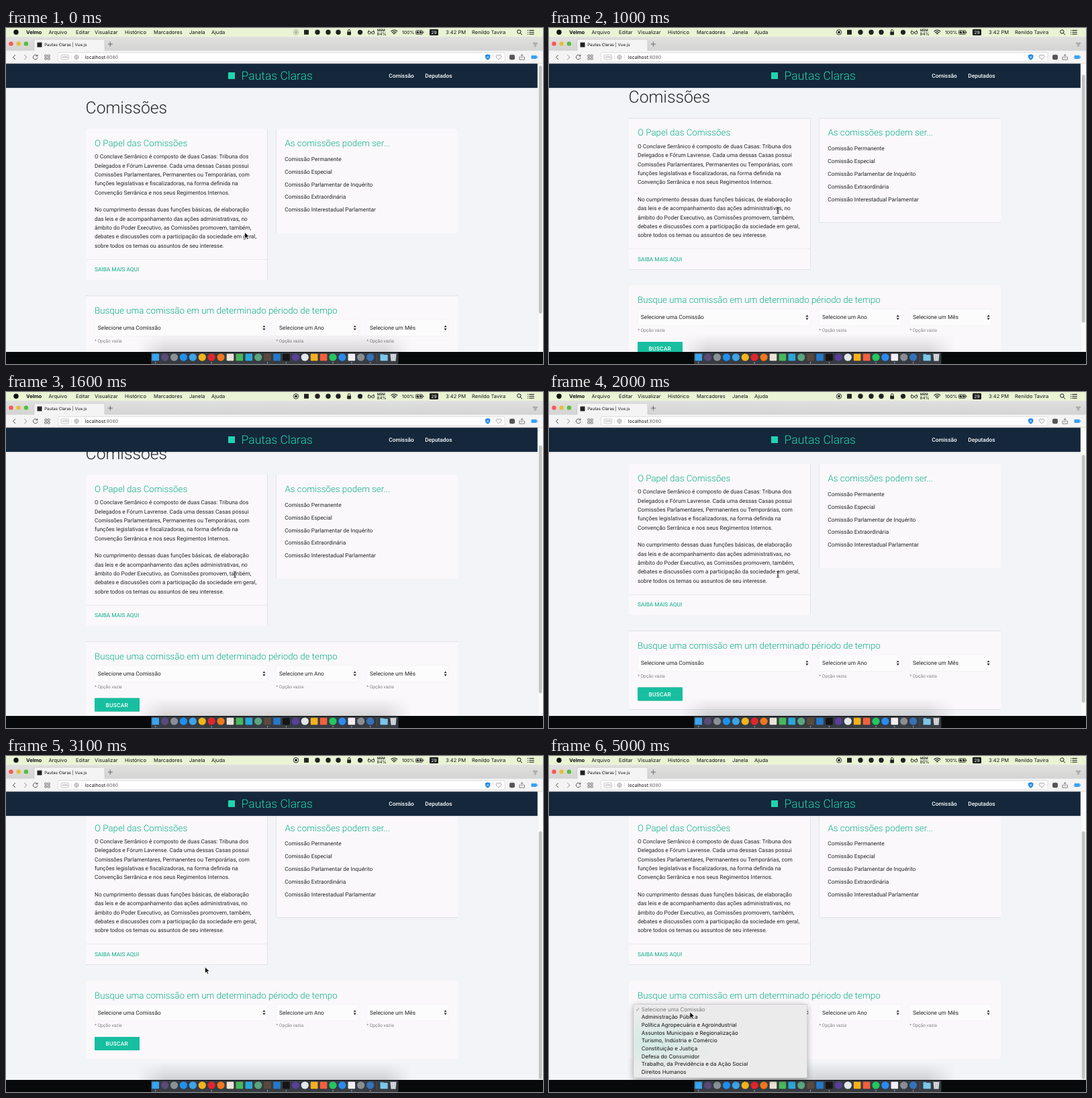
An HTML page that plays this animation: 800x500 px, repeating every 5100 ms.

```html
<!DOCTYPE html>
<html lang="pt-BR">
<head>
<meta charset="utf-8">
<title>Pautas Claras</title>
<style>
  html, body { margin: 0; width: 100%; height: 100%; overflow: hidden; background: #f3f4f7; }
  svg { display: block; width: 800px; height: 500px; }
  text { font-family: Roboto, sans-serif; font-size: 8.33px; fill: #232528; text-rendering: geometricPrecision; white-space: pre; }
  .ui { font-family: Inter, sans-serif; font-size: 7.55px; fill: #111; }
  .title { font-size: 13.33px; font-weight: 300; fill: #0cae8a; }
  .hint { font-size: 6.67px; fill: #808085; }
  .card { fill: #faf8fa; filter: drop-shadow(0 .9px .7px rgba(0, 0, 0, .32)); }
  .line { fill: none; stroke: #555; stroke-width: 1; }
</style>
</head>
<body>
<svg id="stage" viewBox="0 0 800 500" xmlns="http://www.w3.org/2000/svg">
  <defs>
    <clipPath id="view"><rect y="53" width="792" height="429"/></clipPath>
    <linearGradient id="tabs" x2="0" y2="1"><stop stop-color="#e0e1df"/><stop offset="1" stop-color="#d2d3d2"/></linearGradient>
    <linearGradient id="shade" x2="0" y2="1"><stop stop-opacity="0"/><stop offset="1" stop-opacity=".14"/></linearGradient>
    <linearGradient id="fade"><stop stop-color="#000"/><stop offset=".1" stop-color="#fff"/><stop offset=".9" stop-color="#fff"/><stop offset="1" stop-color="#000"/></linearGradient>
    <mask id="soft"><rect x="195" y="455" width="410" height="27" fill="url(#fade)"/></mask>
    <radialGradient id="tint" cx=".1" cy=".52" r=".38"><stop stop-color="#d3ebe5"/><stop offset="1" stop-color="#ebebeb"/></radialGradient>
  </defs>
  <rect width="800" height="500" fill="#f3f4f7"/>
  <g clip-path="url(#view)"><g id="page"></g></g>
  <g id="chrome"></g>
  <g id="dock"></g>
  <g id="menu"></g>
  <g id="arrow"><path d="M0 0V9.2L2.2 7.2 3.6 10.4 5.2 9.7 3.8 6.6H6.7Z" fill="#000" stroke="#fff" stroke-width=".7"/></g>
  <g id="beam"><path d="M-2 0Q0 0 0 1.3Q0 0 2 0M0 1V8M-2 9Q0 9 0 7.7Q0 9 2 9M-1 5.6H1" fill="none" stroke="#222" stroke-width=".9"/></g>
</svg>
<script>
const LOOP = 5100, STEP = 100;
const $ = id => document.getElementById(id);

function add(parent, tag, attrs, content) {
  const el = document.createElementNS('http://www.w3.org/2000/svg', tag);
  for (const key in attrs) el.setAttribute(key, attrs[key]);
  if (content !== undefined) el.textContent = content;
  parent.appendChild(el);
  return el;
}
const label = (g, x, y, s, cls = '', style = '') => add(g, 'text', { x, y, class: cls, style }, s);
const box = (g, x, y, width, height, fill, rx = 0, more = {}) => add(g, 'rect', { x, y, width, height, fill, rx, ...more });
const dot = (g, cx, cy, r, fill) => add(g, 'circle', { cx, cy, r, fill });
const line = (g, d, style = '') => add(g, 'path', { d, class: 'line', style });
const card = (x, y, w, h) => add(page, 'rect', { x, y, width: w, height: h, rx: 1, class: 'card' });

const page = $('page'), chrome = $('chrome'), dock = $('dock'), menu = $('menu');

function drawPage() {
  label(page, 118.6, 126.5, 'Comissões', '', 'font-size:24.7px;font-weight:300');
  card(119, 150, 270.5, 225);
  label(page, 132, 176, 'O Papel das Comissões', 'title');
  const paragraphs = [
    ['O Conclave Serrânico é composto de duas Casas: Tribuna dos',
     'Delegados e Fórum Lavrense. Cada uma dessas Casas possui',
     'Comissões Parlamentares, Permanentes ou Temporárias, com',
     'funções legislativas e fiscalizadoras, na forma definida na',
     'Convenção Serrânica e nos seus Regimentos Internos.'],
    ['No cumprimento dessas duas funções básicas, de elaboração',
     'das leis e de acompanhamento das ações administrativas, no',
     'âmbito do Poder Executivo, as Comissões promovem, também,',
     'debates e discussões com a participação da sociedade em geral,',
     'sobre todos os temas ou assuntos de seu interesse.']];
  paragraphs.forEach((rows, p) => rows.forEach((s, i) => label(page, 132, 194.4 + p * 79 + i * 13.36, s)));
  box(page, 119, 344, 270.5, .7, '#e6e4e7');
  label(page, 132, 362.2, 'SAIBA MAIS AQUI', '', 'fill:#0cae8a');

  card(402.5, 150, 270.5, 155);
  label(page, 415.5, 176, 'As comissões podem ser...', 'title');
  ['Permanente', 'Especial', 'Parlamentar de Inquérito', 'Extraordinária', 'Interestadual Parlamentar']
    .forEach((s, i) => label(page, 415.3, 197.8 + i * 18.88, 'Comissão ' + s));

  card(119, 398.5, 554, 117);
  label(page, 132, 425, 'Busque uma comissão em um determinado périodo de tempo', 'title');
  [[132, 257, 'uma Comissão'], [402.3, 122, 'um Ano'], [537.2, 122, 'um Mês']].forEach(([x, w, s]) => {
    box(page, x, 434, w, 24.5, '#fdfcfd', 1, { stroke: '#f0eef1', 'stroke-width': .6 });
    label(page, x + 4.8, 449, 'Selecione ' + s);
    const a = x + w - 4.6;
    add(page, 'path', { d: `M${a - 2.1} 445.3L${a} 442.4 ${a + 2.1} 445.3ZM${a - 2.1} 447.1L${a} 450 ${a + 2.1} 447.1Z`, fill: '#333' });
    label(page, x, 467.9, '* Opção vazia', 'hint');
  });
  add(page, 'rect', { x: 132, y: 482.5, width: 67, height: 20, rx: 1, class: 'card', style: 'fill:#17bfa0' });
  label(page, 148.5, 495.5, 'BUSCAR', '', 'fill:#fff;font-weight:500;letter-spacing:.28px');
}

let memory, thumb, recorder;
function drawChrome() {
  // System menu bar
  box(chrome, 0, 0, 800, 13, '#eaf4d5');
  dot(chrome, 15, 6.2, 3.7, '#111');
  label(chrome, 30, 9, 'Velmo', 'ui', 'font-weight:700');
  [[63.5, 'Arquivo'], [104, 'Editar'], [132, 'Visualizar'], [177, 'Histórico'], [220, 'Marcadores'], [273, 'Janela'], [306, 'Ajuda']]
    .forEach(([x, s]) => label(chrome, x, 9, s, 'ui'));
  recorder = add(chrome, 'g', {});
  line(recorder, 'M428.2 6.3a3.8 3.8 0 1 0 7.6 0a3.8 3.8 0 1 0-7.6 0', 'stroke:#222;stroke-width:.9');
  box(recorder, 430.3, 4.6, 3.4, 3.4, '#222', .5);
  box(chrome, 444, 2.8, 7, 7, '#222', .5);
  [464, 480, 495].forEach(x => dot(chrome, x, 6.3, 3.7, '#222'));
  box(chrome, 508.2, 5.5, 5.8, 5, '#222', .7);
  line(chrome, 'M509.5 6V4.2a1.7 1.7 0 0 1 3.4 0V6', 'stroke:#222');
  dot(chrome, 527.5, 6.3, 3.6, '#222');
  line(chrome, 'M539.3 7a2 2 0 1 0 4 0a2 2 0 1 0-4 0M544.7 7a2 2 0 1 0 4 0a2 2 0 1 0-4 0M543.3 6.6h1.4M539.3 6.4l1.2-3M548.7 6.4l-1.2-3', 'stroke:#222;stroke-width:.9');
  label(chrome, 553, 5.2, 'MEM', 'ui', 'font-size:4.8px;font-weight:600');
  memory = label(chrome, 552.5, 11, '84%', 'ui', 'font-size:6.3px');
  line(chrome, 'M573.4 5.1Q578.3 0.9 583.2 5.1M575.1 7Q578.3 4.2 581.5 7M576.8 8.8Q578.3 7.6 579.8 8.8', 'stroke:#111;stroke-width:1.2');
  label(chrome, 590, 9, '100%', 'ui', 'font-size:6.9px');
  box(chrome, 610.5, 3.6, 10, 5.8, 'none', 1, { stroke: '#222', 'stroke-width': .8 });
  box(chrome, 611.7, 4.8, 7.6, 3.4, '#222');
  box(chrome, 621.3, 5.4, 1, 2.2, '#222');
  line(chrome, 'M616 3.4l-1.6 3h2.4l-1.6 3', 'stroke:#eaf4d5;stroke-width:.8');
  box(chrome, 631, 1.8, 13, 9.2, '#1c1c1c', 1.3);
  label(chrome, 637.5, 8.9, '29', 'ui', 'fill:#fff;font-size:6.6px;text-anchor:middle');
  label(chrome, 655, 9, '3:42 PM', 'ui');
  label(chrome, 694, 9, 'Renildo Tavira', 'ui');
  line(chrome, 'M761.6 5.5a2.7 2.7 0 1 0 5.4 0a2.7 2.7 0 1 0-5.4 0M766.2 7.5L769 10.3', 'stroke:#111');
  line(chrome, 'M777 3.5h1M779.3 3.5h7.5M777 6.3h1M779.3 6.3h7.5M777 9.1h1M779.3 9.1h7.5', 'stroke:#111');

  // Tab strip
  box(chrome, 0, 13, 800, 21, 'url(#tabs)');
  ['#fc5753', '#e9bd3a', '#53bf3b'].forEach((c, i) => dot(chrome, 7.5 + i * 11.2, 23.4, 3.2, c));
  add(chrome, 'path', { d: 'M42 34V19q0-2 2-2h101q2 0 2 2V34Z', fill: '#f4f4f4', stroke: '#bfc0bf', 'stroke-width': .6 });
  box(chrome, 46.5, 21.5, 7, 7, '#222');
  label(chrome, 57.2, 26.9, 'Pautas Claras | Vue.js', 'ui', 'font-size:6.15px');
  line(chrome, 'M155.3 20.5v7M151.8 24h7', 'stroke:#666');
  line(chrome, 'M785 22.5h7M786.2 24.8h4.6M787.3 27h2.4', 'stroke:#666;stroke-width:.8');

  // Toolbar
  box(chrome, 0, 33.8, 800, 19.2, '#f4f4f4');
  box(chrome, 42.3, 33, 104.4, 1.6, '#f4f4f4');
  line(chrome, 'M14 40l-3.6 3.5 3.6 3.5');
  line(chrome, 'M27.3 40l3.6 3.5-3.6 3.5', 'stroke:#888');
  line(chrome, 'M46.3 41.3a3.3 3.3 0 1 0 .7 2.6M47 39.6v2.3h-2.4');
  [57.8, 62.2].forEach(x => [40, 44.2].forEach(y => box(chrome, x, y, 3, 2.8, 'none', .5, { stroke: '#555', 'stroke-width': .8 })));
  box(chrome, 77.5, 36.7, 665.5, 13.3, '#fff', 1.5, { stroke: '#d3d3d3', 'stroke-width': .7 });
  box(chrome, 82, 40, 11.5, 7, 'none', 1, { stroke: '#aaa', 'stroke-width': .7 });
  label(chrome, 87.8, 45.3, 'VPN', 'ui', 'font-size:4.4px;fill:#888;text-anchor:middle');
  box(chrome, 97, 39.8, .6, 7, '#ddd');
  line(chrome, 'M101.7 43.4a3.3 3.3 0 1 0 6.6 0a3.3 3.3 0 1 0-6.6 0M101.7 43.4h6.6M105 40.1q-3 3.3 0 6.6q3-3.3 0-6.6', 'stroke:#999;stroke-width:.7');
  box(chrome, 112.3, 39.8, .6, 7, '#ddd');
  const host = label(chrome, 117.8, 46, 'localhost', 'ui', 'font-size:7px');
  add(host, 'tspan', { fill: '#666' }, ':8080');
  add(chrome, 'path', { d: 'M714 40.2L717.7 39 721.4 40.2V43.5Q721 46.3 717.7 47.7Q714.4 46.3 714 43.5Z', fill: '#2487e8' });
  line(chrome, 'M716.2 41.9l3 3M719.2 41.9l-3 3', 'stroke:#fff;stroke-width:.8');
  box(chrome, 725.6, 38, .6, 10.5, '#ddd');
  line(chrome, 'M734 47C728.6 43.2 730 40 732 40Q733.4 40 734 41.3Q734.6 40 736 40C738 40 739.4 43.2 734 47Z', 'stroke:#888;stroke-width:.8');
  box(chrome, 750, 39.8, 8, 7.4, '#555', 2.2);
  line(chrome, 'M767 43.2h-2v4h7.4v-4h-2M768.7 45v-5.6M766.8 41.2l1.9-1.9 1.9 1.9', 'stroke:#666;stroke-width:.8');
  box(chrome, 782.5, 40.8, 8.2, 5.2, '#3aa0f3', 1);
  box(chrome, 791.2, 42.2, 1, 2.4, '#3aa0f3');

  // Site header and scrollbar
  box(chrome, 0, 53, 792, 36, '#14273b', 0, { style: 'filter:drop-shadow(0 .7px .8px rgba(0,0,0,.3))' });
  box(chrome, 792, 53, 8, 429, '#fafafa');
  box(chrome, 791.8, 53, .5, 429, '#e6e6e6');
  thumb = box(chrome, 793.8, 56, 4.8, 369, '#c1c2c3', 2.4);
  box(chrome, 0, 52.6, 800, .6, '#c9c9c9');
  box(chrome, 331, 66, 10, 10, '#22d3b0');
  label(chrome, 350.6, 76.6, 'Pautas Claras', '', 'font-size:17.5px;font-weight:300;fill:#22d3b0');
  label(chrome, 570.3, 74, 'Comissão', '', 'fill:#fff;font-weight:500');
  label(chrome, 624.3, 74, 'Deputados', '', 'fill:#fff;font-weight:500');
}

function drawDock() {
  box(dock, 195, 455, 410, 27, 'url(#shade)', 0, { mask: 'url(#soft)' });
  box(dock, 0, 482, 800, 18, '#08090b');
  box(dock, 216, 483, 368.5, 17, '#363b42', 1.5);
  // Leading "o" draws a round icon, "s" a square one
  const icons = 's39a4ee o5b4a78 o8b9096 o1e90f0 o3aa5ea of2b51d oe0262e of0781e se9e4d4 s48b85c s2ba6d6 o5aa680 s5a4a3c s2479c8 s151515 o5a3f9a oe3e6ea sf5b01e sf2603f o22c75f o2b8bf0 sf3eef2 o8a8d92 o3572b8'.split(' ');
  icons.forEach((icon, i) => {
    const x = 222.7 + i * 13.91, color = '#' + icon.slice(1);
    if (icon[0] === 'o') dot(dock, x, 490, 5.6, color);
    else box(dock, x - 5.3, 484.7, 10.6, 10.6, color, 1.2);
    if ([0, 6, 12, 14, 19, 21, 23].includes(i)) dot(dock, x, 498, .7, '#ddd');
  });
  box(dock, 552.3, 485, .5, 12, '#666');
  box(dock, 557.5, 485.2, 5, 3, '#69b7df', .7);
  box(dock, 557.5, 486.3, 11.2, 8.9, '#7cc6e9', .8);
  add(dock, 'path', { d: 'M572.5 485h9l-1 10.5h-7Z', fill: '#d6dadd' });
  line(dock, 'M572.3 485.2h9.4M575.2 487l.3 7M578.8 487l-.3 7', 'stroke:#a4abb0;stroke-width:.6');
}

function drawMenu() {
  box(menu, 125.7, 369.5, 259, 109.5, 'url(#tint)', 2.5,
    { stroke: '#bdbdbf', 'stroke-width': .5, style: 'filter:drop-shadow(0 2px 4px rgba(0,0,0,.32))' });
  line(menu, 'M129.8 377.3l1.5 1.8 2.7-4.2', 'stroke:#888;stroke-width:.8');
  ['Selecione uma Comissão', 'Administração Pública', 'Política Agropecuária e Agroindustrial',
   'Assuntos Municipais e Regionalização', 'Turismo, Indústria e Comércio', 'Constituição e Justiça',
   'Defesa do Consumidor', 'Trabalho, da Previdência e da Ação Social', 'Direitos Humanos']
    .forEach((s, i) => label(menu, 137.8, 379.8 + i * 11.65, s, 'ui', `font-size:7.98px;fill:${i ? '#111' : '#77787c'}`));
}

// Rows of [time, value, ...]
const SCROLL = [[0, 0], [600, 0], [1000, 15.6], [1300, 21], [1600, 27], [2000, 43], [2400, 60], [2600, 64.5]];
const POINTER = [[0, 355.5, 304], [200, 350, 290], [500, 341, 267], [2600, 341, 267], [3100, 296.5, 314], [3600, 235, 362], [3900, 210, 381]];
const RECORDING = 300, BEAM_ON = 300, BEAM_OFF = 2800, MEMORY_DROP = 3700, MENU_OPEN = 4400;

function at(rows, t) {
  const n = rows.findIndex(r => r[0] > t);
  if (n < 0) return rows[rows.length - 1].slice(1);
  const a = rows[n - 1], b = rows[n], k = (t - a[0]) / (b[0] - a[0]);
  return a.slice(1).map((v, i) => v + (b[i + 1] - v) * k);
}
const show = (el, on) => el.setAttribute('visibility', on ? 'visible' : 'hidden');

function render(t) {
  const [scroll] = at(SCROLL, t), [x, y] = at(POINTER, t);
  const beam = t >= BEAM_ON && t < BEAM_OFF;
  page.setAttribute('transform', `translate(0 ${-scroll})`);
  thumb.setAttribute('y', 56 + scroll * .87);
  recorder.setAttribute('opacity', t < RECORDING ? .35 : 1);
  memory.textContent = t < MEMORY_DROP ? '84%' : '80%';
  for (const id of ['arrow', 'beam']) {
    $(id).setAttribute('transform', `translate(${x} ${y})`);
    show($(id), (id === 'beam') === beam);
  }
  show(menu, t >= MENU_OPEN);
}

drawPage();
drawChrome();
drawDock();
drawMenu();

const start = performance.now();
function tick() {
  const t = (performance.now() - start) % LOOP;
  render(Math.floor(t / STEP) * STEP);
  requestAnimationFrame(tick);
}
render(0);
requestAnimationFrame(tick);
</script>
</body>
</html>
```
